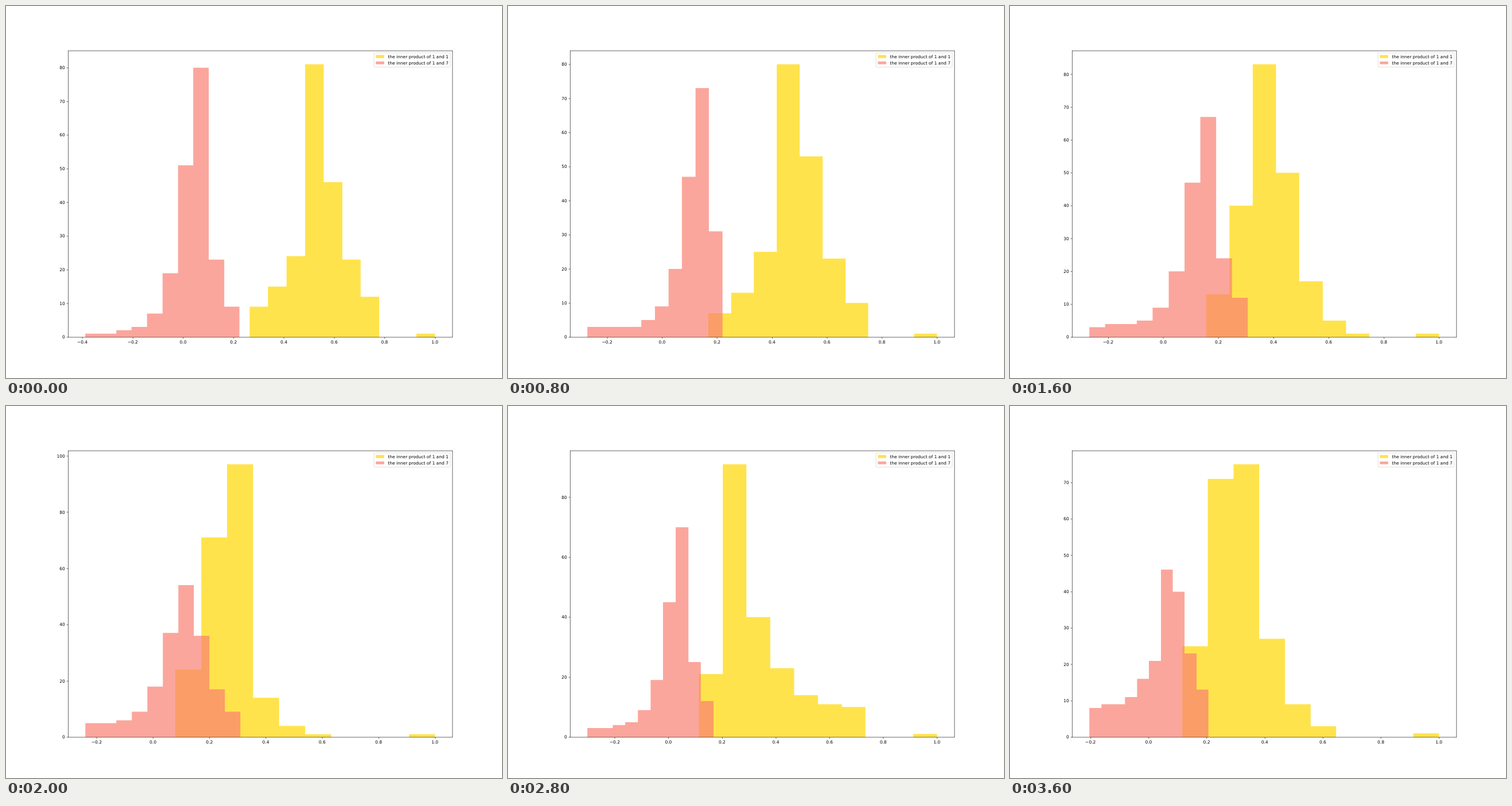
An HTML page that plays this animation: 864 px wide and 648 px high, repeating every 4 s.

```html
<!DOCTYPE html>
<html lang="en">
<head>
<meta charset="utf-8">
<title>Inner product histograms</title>
<style>
  html, body { margin: 0; width: 100%; height: 100%; overflow: hidden; background: #fff; }
  svg { display: block; width: 864px; height: 648px; }
  text { font: 13.889px "DejaVu Sans", sans-serif; text-rendering: geometricPrecision; }
  .gold { fill: gold; fill-opacity: .7; }
  .salmon { fill: salmon; fill-opacity: .7; }
  .line { fill: none; stroke: #000; stroke-width: 1.111; }
</style>
</head>
<body>
<svg viewBox="0 0 1600 1200">
  <path id="same" class="gold"/>
  <path id="cross" class="salmon"/>
  <path id="ticks" class="line"/>
  <rect class="line" x="200.5" y="144.5" width="1240" height="924"/>
  <g id="xLabels" text-anchor="middle"></g>
  <g id="yLabels" text-anchor="end"></g>
  <rect x="1187" y="151" width="246" height="46" rx="2.8"
        fill="#fff" fill-opacity=".8" stroke="#ccc" stroke-opacity=".8" stroke-width="1.389"/>
  <rect class="gold" x="1193" y="158" width="27" height="10"/>
  <rect class="salmon" x="1193" y="179" width="27" height="9"/>
  <text x="1232" y="168">the inner product of 1 and 1</text>
  <text x="1232" y="188">the inner product of 1 and 7</text>
</svg>
<script>
const STEP = 400;
const BINS = 10;
const DECAY = .36;
const SAME_TOTAL = 210, SAME_BINS = 7;
const CROSS_TOTAL = 196;
const AXES = { left: 200, right: 1440, top: 144, bottom: 1068 };
const MARGIN = (AXES.right - AXES.left) / 22;
const DATA_RIGHT = AXES.right - MARGIN;
const DATA_WIDTH = AXES.right - AXES.left - 2 * MARGIN;

// A hump is its peak bin and the counts just left of, at and just right of it.
const hump = (bin, left, peak, right) => ({ bin, left, peak, right });

// Salmon data span low..high, gold data span start..1.
const pose = (low, high, start, same, cross) => ({ low, high, start, same, cross });

const mid = (a, b) => typeof a === "number"
  ? (a + b) / 2
  : Object.fromEntries(Object.keys(a).map(key => [key, mid(a[key], b[key])]));

function between(a, b, peak) {
  const result = mid(a, b);
  result.same.peak = peak;
  return result;
}

const apart = pose(-.3877, .2242, .2638, hump(3, 24, 81, 46), hump(7, 51, 80, 23));
const closer = pose(-.2505, .2547, .18, hump(3, 30, 90, 52), hump(8, 55, 77, 31));
const steep = pose(-.2923, .1845, .156, hump(2, 20, 103, 53), hump(8, 39, 69, 31));
const overlap = pose(-.2677, .3062, .1563, hump(2, 40, 83, 50), hump(7, 47, 67, 24));
const mixed = pose(-.2395, .3095, .0789, hump(2, 71, 97, 14), hump(6, 37, 54, 36));
const skewed = pose(-.3013, .168, .1138, hump(1, 21, 91, 40), hump(7, 45, 70, 25));
const broad = pose(-.2035, .2062, .116, hump(2, 71, 75, 27), hump(6, 21, 46, 40));

const poses = [
  apart, closer, between(closer, steep, 80), steep, overlap,
  mixed, between(mixed, skewed, 96), skewed, between(skewed, broad, 83), broad
];

// Both tails fade geometrically; samples left over are spread evenly along them.
function countBins({ bin, left, peak, right }, total, size) {
  const center = Math.round(bin);
  const raw = Array.from({ length: size }, (_, i) => {
    const d = i - center;
    return d ? (d < 0 ? left : right) * DECAY ** (Math.abs(d) - 1) : peak;
  });
  const spare = (total - raw.reduce((a, b) => a + b)) / (size - 3);
  return raw.map((n, i) => Math.max(0, Math.round(Math.abs(i - center) > 1 ? n + spare : n)));
}

const byId = id => document.getElementById(id);
const label = (x, y, value) => `<text x="${x}" y="${Math.round(y)}">${value}</text>`;

function histogram(counts, from, to, toX, toY) {
  const edge = i => Math.round(toX(from + (to - from) * i / BINS));
  const steps = counts.map((n, i) => `V${Math.round(toY(n))}H${edge(i + 1)}`);
  return `M${edge(0)} ${AXES.bottom}${steps.join("")}V${AXES.bottom}Z`;
}

function draw({ low, high, start, same, cross }) {
  const gold = [...countBins(same, SAME_TOTAL, SAME_BINS), 0, 0, 1];
  const salmon = countBins(cross, CROSS_TOTAL, BINS);
  const yMax = Math.max(...gold, ...salmon) * 1.05;
  const toX = v => DATA_RIGHT - (1 - v) * DATA_WIDTH / (1 - low);
  const toY = n => AXES.bottom - n * (AXES.bottom - AXES.top) / yMax;

  byId("same").setAttribute("d", histogram(gold, start, 1, toX, toY));
  byId("cross").setAttribute("d", histogram(salmon, low, high, toX, toY));

  let marks = "", xText = "", yText = "";
  for (let k = -2; k <= 5; k++) {
    const x = toX(k / 5);
    if (x < AXES.left) continue;
    marks += `M${Math.round(x) + .5} ${AXES.bottom + .5}v4.86`;
    xText += label(x, AXES.bottom + 20.28, (k / 5).toFixed(1).replace("-", "\u2212"));
  }
  const gap = yMax > 90 ? 20 : 10;
  for (let n = 0; n <= yMax; n += gap) {
    const y = toY(n);
    marks += `M${AXES.left + .5} ${Math.round(y) + .5}h-4.86`;
    yText += label(AXES.left - 9.72, y + 5.28, n);
  }
  byId("ticks").setAttribute("d", marks);
  byId("xLabels").innerHTML = xText;
  byId("yLabels").innerHTML = yText;
}

let shown = -1;
function tick() {
  const index = Math.floor(performance.now() / STEP) % poses.length;
  if (index !== shown) draw(poses[shown = index]);
  requestAnimationFrame(tick);
}
tick();
</script>
</body>
</html>
```
